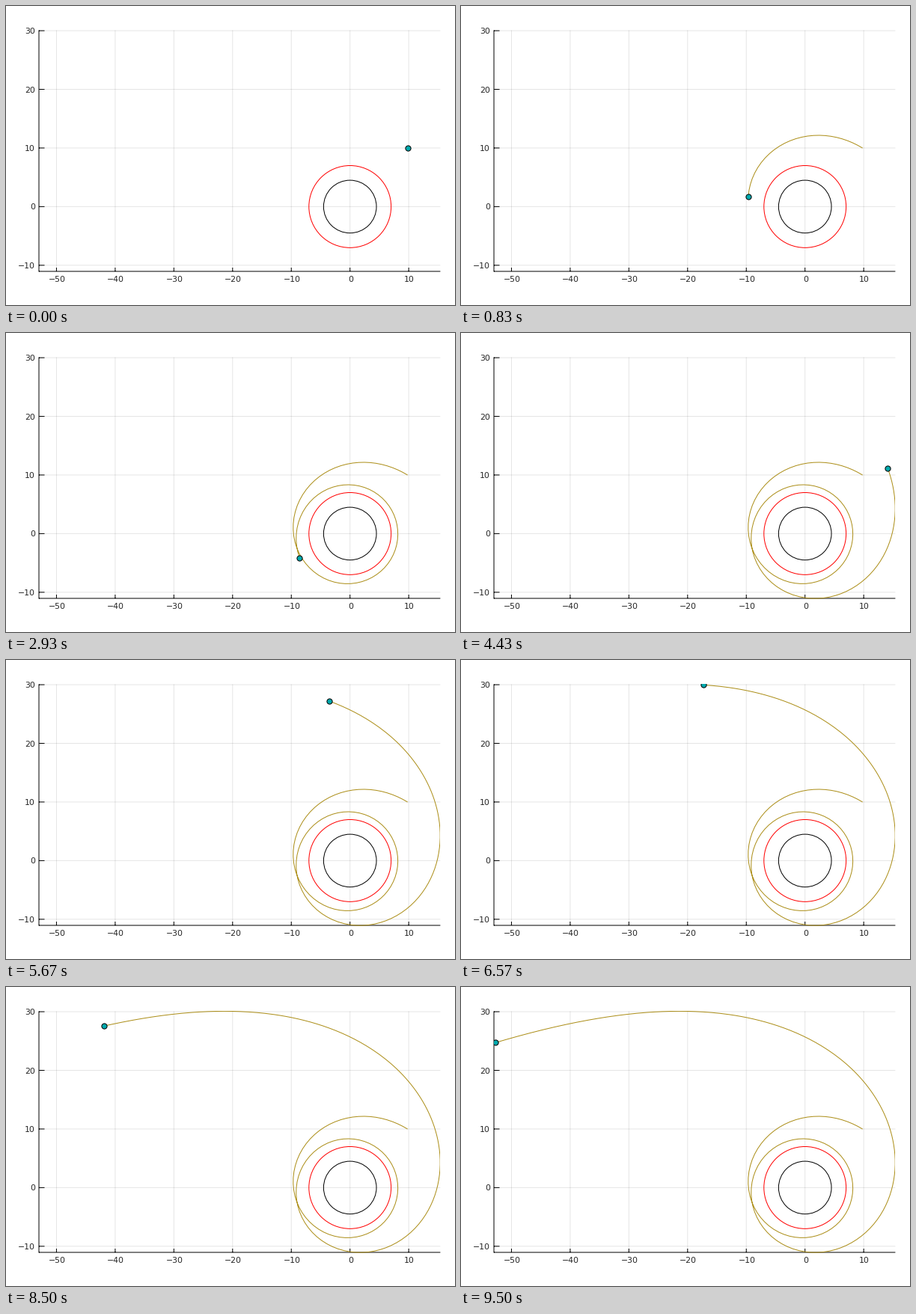
A matplotlib script that plays this animation: 600x400 px, repeating every 9530 ms.

```python
import numpy as np
import matplotlib.pyplot as plt
from matplotlib.animation import FuncAnimation
from matplotlib.patches import Circle, Rectangle

LOOP, TICKS = 9530, 477            # loop in ms, redraws per loop
POSES = 286                        # positions on the orbit, 30 per second
DPI = 100
PX = 72 / DPI                      # points per pixel
X0, Y0, UNIT = 459.7, 268.4, 7.845  # origin and scale in pixels
LEFT, RIGHT, TOP, BOTTOM = 44, 580.4, 32.4, 355
GOLD, TEAL = "#ac8e18", "#00a9ad"

PERI_R, PERI_ANGLE, PERI_POSE = 8.142, np.radians(375.8), 57.8


def sx(x):
    return X0 + UNIT * np.asarray(x)


def sy(y):
    return Y0 - UNIT * np.asarray(y)


def closeness(psi):
    """Closest distance over distance, at angle psi from the closest point."""
    psi = np.abs(psi)
    return np.cos(0.1648 * psi) + 0.0019 * np.maximum(0, psi - 7.1) ** 2


def orbit():
    """Pixel positions of all poses; the sweep slows down near the centre."""
    psi = np.linspace(0, 8.8, 4000)
    c = closeness(psi)
    pace = (PERI_R / c) ** 2 / (13.95 - 6.84 * c ** 3.25)
    time = np.r_[0, np.cumsum((pace[1:] + pace[:-1]) / 2 * np.diff(psi))]
    tau = np.arange(POSES) - PERI_POSE
    swept = np.sign(tau) * np.interp(np.abs(tau), time, psi)
    r, phi = PERI_R / closeness(swept), swept + PERI_ANGLE
    return sx(r * np.cos(phi)), sy(r * np.sin(phi))


px, py = orbit()

fig = plt.figure(figsize=(6, 4), dpi=DPI, facecolor="white")
ax = fig.add_axes([0, 0, 1, 1])
ax.set_xlim(0, 600)
ax.set_ylim(400, 0)
ax.axis("off")


def line(xs, ys, color="black", **kw):
    return ax.plot(xs, ys, color=color, lw=PX, snap=False,
                   solid_capstyle="butt", **kw)[0]


def segments(parts, **kw):
    """Draw separate straight lines (x1, y1, x2, y2) as one artist."""
    pts = [p for a, b, c, d in parts for p in ((a, b), (c, d), (np.nan, np.nan))]
    line(*zip(*pts), **kw)


def label(x, y, value, ha):
    ax.text(x, y, str(value).replace("-", "\u2212"), ha=ha, va="center_baseline",
            family="DejaVu Sans", size=10.9 * PX, color="#242424")


xticks, yticks = range(-50, 11, 10), range(-10, 31, 10)
segments([(sx(v), TOP, sx(v), BOTTOM) for v in xticks], alpha=0.1)
segments([(LEFT, sy(v), RIGHT, sy(v)) for v in yticks], alpha=0.1)
segments([(sx(v), BOTTOM - 5, sx(v), BOTTOM) for v in xticks]
         + [(LEFT, sy(v), LEFT + 7.5, sy(v)) for v in yticks]
         + [(LEFT, TOP, LEFT, BOTTOM + 0.5), (LEFT, BOTTOM, RIGHT, BOTTOM)])
for v in xticks:
    label(sx(v) + 0.7, 364.9, v, "center")
for v in yticks:
    label(39, sy(v), v, "right")

for size, color in ((4.5, "black"), (7, "red")):
    ax.add_patch(Circle((X0, Y0), size * UNIT, fill=False, ec=color, lw=PX, zorder=3))

view = Rectangle((LEFT, TOP), RIGHT - LEFT, BOTTOM + 0.5 - TOP, transform=ax.transData)
trail = line([], [], GOLD, zorder=4)
dot = ax.plot([], [], "o", ms=7.2 * PX, mfc=TEAL, mec="black", mew=PX,
              snap=False, zorder=5)[0]
for artist in (trail, dot):
    artist.set_clip_path(view)


def update(n):
    # Poses change on a 10 ms grid: take the one reached when this redraw ends.
    end = (n + 1) * LOOP / TICKS - 0.01
    i = min(POSES - 1, int((end // 10 + 0.5) * 0.3))
    trail.set_data(px[:i + 1], py[:i + 1])
    dot.set_data([px[i]], [py[i]])
    return trail, dot


anim = FuncAnimation(fig, update, frames=TICKS, interval=LOOP / TICKS,
                     init_func=lambda: update(0), repeat=True, repeat_delay=0)
plt.show()
```
